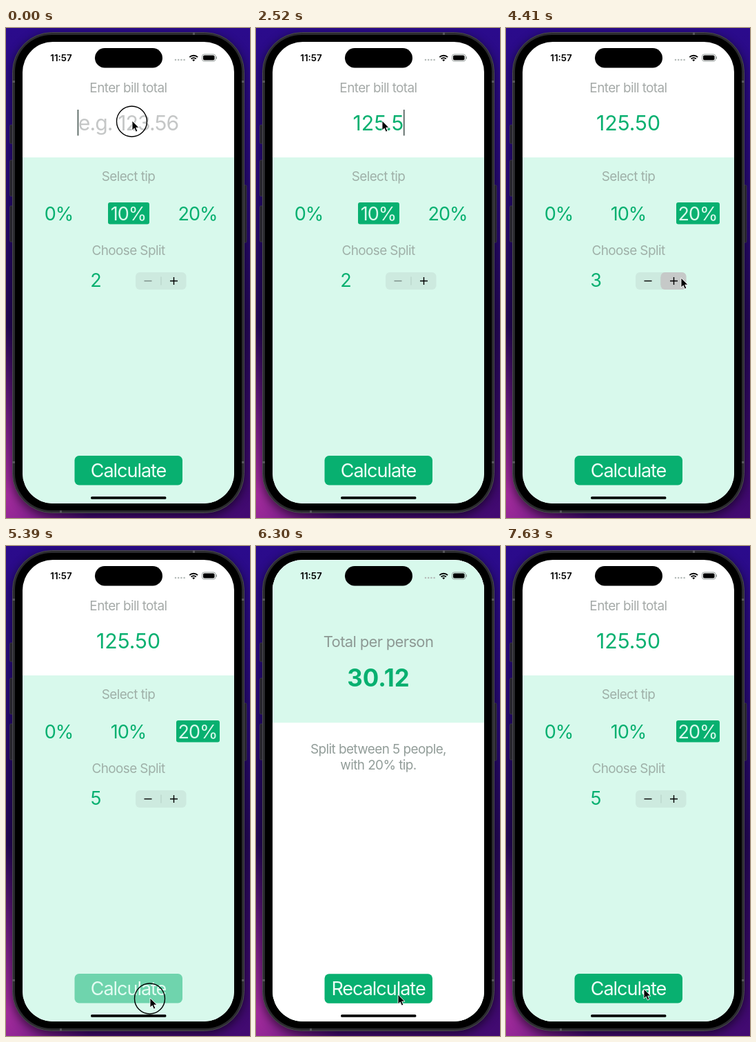
These frames come from a looping animation (354 by 708 pixels, 7.7 s). An HTML page:

```html
<!DOCTYPE html>
<html lang="en">
<head>
<meta charset="utf-8">
<title>Tip calculator</title>
<style>
html, body { margin: 0; height: 100%; overflow: hidden; background: #220a63; }
svg { display: block; width: 100%; height: 100%; }
text { font: 400 18.9px Inter, Roboto, sans-serif; font-optical-sizing: none; letter-spacing: -.03em; text-anchor: middle; fill: #a5aaa8; }
.num { font-size: 30.2px; letter-spacing: 0; fill: #08b070; }
.hint { font-size: 30.2px; letter-spacing: -.03em; fill: #c5c7c7; }
.tip { font-size: 27px; letter-spacing: -.04em; fill: #08b070; }
.tip.on { fill: #d8f9ec; }
.label { font-size: 27px; letter-spacing: -.038em; fill: #effff8; }
.total { font-size: 34.8px; font-weight: 700; }
.caption { font-size: 22px; fill: #8d9994; }
.note { fill: #929d99; }
.clock { font-size: 13.3px; font-weight: 600; letter-spacing: 0; fill: #000; }
.mint { fill: #d8f9ec; }
.soft { fill: #9fb0a8; }
.green { fill: #08b070; }
</style>
</head>
<body>
<svg viewBox="0 0 354 708" preserveAspectRatio="none">
  <defs>
    <linearGradient id="wall" x2="0" y2="1">
      <stop offset="0" stop-color="#2b0b8c"/>
      <stop offset=".3" stop-color="#280a78"/>
      <stop offset=".6" stop-color="#250858"/>
      <stop offset="1" stop-color="#430a72"/>
    </linearGradient>
    <radialGradient id="glow" cx="0" cy=".95" r=".34">
      <stop offset="0" stop-color="#a32c9c"/>
      <stop offset="1" stop-color="#a32c9c" stop-opacity="0"/>
    </radialGradient>
    <filter id="blur"><feGaussianBlur stdDeviation="7"/></filter>
    <clipPath id="screen"><rect x="24" y="20" width="307" height="667" rx="44"/></clipPath>
  </defs>

  <rect width="354" height="708" fill="url(#wall)"/>
  <rect width="354" height="708" fill="url(#glow)"/>
  <rect x="9" y="10" width="337" height="695" rx="57" opacity=".55" filter="url(#blur)"/>

  <g fill="#25232b" stroke="#44424a" stroke-width=".6">
    <rect x="5.500" y="140" width="6" height="27" rx="1.500"/>
    <rect x="5.500" y="191" width="6" height="52" rx="1.500"/>
    <rect x="5.500" y="257" width="6" height="52" rx="1.500"/>
    <rect x="343" y="227" width="6" height="83" rx="1.500"/>
  </g>
  <rect x="9.500" y="6.500" width="336" height="694" rx="57" fill="#2b2b2f" stroke="#4b4a50"/>
  <path d="M9 77.500h4M342 77.500h4M9 627.500h4M342 627.500h4M272.500 6v4M79.500 697v4" stroke="#55545a" stroke-width="3"/>
  <rect x="13" y="10" width="329" height="687" rx="53" fill="#000"/>

  <g clip-path="url(#screen)">
    <rect x="24" y="20" width="308" height="668" fill="#fff"/>
    <rect class="mint" x="24" y="187" width="308" height="501"/>
    <text x="177.500" y="92.500">Enter bill total</text>
    <text id="hint" class="hint" x="177.500" y="147.500">e.g. 123.56</text>
    <text id="bill" class="num" x="177.500" y="147.500"></text>
    <rect id="caret" y="118" width="1.500" height="37.500" fill="#3f4f4a"/>

    <text class="soft" x="177.500" y="221">Select tip</text>
    <rect id="pick" class="green" y="252" height="31.500" rx="3"/>
    <text class="tip" x="76.500" y="277.500">0%</text>
    <text class="tip" x="177.500" y="277.500">10%</text>
    <text class="tip" x="278" y="277.500">20%</text>

    <text class="soft" x="177.500" y="327.500">Choose Split</text>
    <text id="count" class="tip" x="130" y="374"></text>
    <rect x="188" y="353" width="73.500" height="25" rx="6" fill="#cdeadf"/>
    <path d="M225 359.500v12" stroke="#b3cdc3"/>
    <rect id="press" x="224.500" y="353" width="37" height="25" rx="6" fill="#c6c9c8"/>
    <path id="minus" d="M200.500 365.500h11" stroke="#000" stroke-width="1.400"/>
    <path d="M238 365.500h11M243.500 360v11" stroke="#000" stroke-width="1.400"/>

    <g id="calc">
      <rect class="green" x="99.500" y="618" width="156.500" height="42.500" rx="6.500"/>
      <text class="label" x="177.500" y="649">Calculate</text>
    </g>

    <g id="sheet">
      <rect x="24" y="20" width="308" height="668" fill="#fff"/>
      <rect class="mint" x="24" y="20" width="308" height="235"/>
      <text class="caption" x="177.500" y="146">Total per person</text>
      <text class="num total" x="177.500" y="203">30.12</text>
      <text class="note" x="177.500" y="300">Split between 5 people,</text>
      <text class="note" x="177.500" y="323">with 20% tip.</text>
      <g id="again">
        <rect class="green" x="99.500" y="618" width="156.500" height="42.500" rx="6.500"/>
        <text class="label" x="177.500" y="649">Recalculate</text>
      </g>
    </g>

    <text class="clock" x="80" y="47.700">11:57</text>
    <rect x="129" y="29" width="98" height="28.500" rx="14.250"/>
    <path d="M246 46h13" stroke="#b5bbb9" stroke-width="2.600" stroke-linecap="round" stroke-dasharray="0 4.200"/>
    <g fill="none" stroke="#000" stroke-width="1.900">
      <path d="M266.300 42.200a8.300 8.300 0 0 1 11.800 0M268.600 44.700a5 5 0 0 1 7.200 0"/>
      <path d="M270.200 46l2 2.200 2-2.200q-2-1.500-4 0z" fill="#000" stroke="none"/>
    </g>
    <rect x="284.500" y="38" width="19.500" height="10" rx="3" fill="none" stroke="#8e9693" stroke-width=".9"/>
    <rect x="286" y="39.500" width="16.500" height="7" rx="1.800"/>
    <path d="M305.400 41.300v3.400" stroke="#8e9693" stroke-width="1.200"/>
    <rect x="123" y="677" width="109.500" height="3.800" rx="1.900"/>
  </g>

  <g id="mouse">
    <circle id="touch" cx="-.5" cy="1" r="22" fill="none" stroke="#000" stroke-width="1.400"/>
    <path d="M0 0V14l3.200-3 2.200 5.100 2.500-1.100-2.200-4.900h4.300z" stroke="#fff" stroke-width=".9"/>
  </g>
</svg>
<script>
const LOOP = 7700, STEP = 70, HEIGHT = 668;
const $ = id => document.getElementById(id);
const tips = document.querySelectorAll('.tip');

const typed = [[0, ''], [1330, '1'], [1400, '12'], [1540, '125'], [2170, '125.'], [2520, '125.5'], [2730, '125.50']];
const counts = [[0, 2], [4270, 3], [4550, 4], [4760, 5]];
const touches = [[0, 70], [3710, 3850], [4270, 4340], [4550, 4620], [4760, 4830], [5390, 5530], [6790, 7000]];
const path = [[0, 183, 134], [3220, 183, 134], [3710, 283, 267], [3850, 283, 267], [4270, 254, 361],
  [5040, 254, 361], [5390, 209, 653], [5740, 209, 653], [6300, 206, 648], [6510, 206, 648], [6790, 200, 640], [LOOP, 200, 640]];
const blink = [[0, 1], [490, 1], [770, 0], [840, 0], [1050, 1], [2030, 1], [2310, 0]];

const latest = (list, t) => list.filter(k => k[0] <= t).pop()[1];
const within = (t, a, b) => t >= a && t < b;
const clamp = v => Math.min(1, Math.max(0, v));
const smooth = p => p * p * (3 - 2 * p);

function tween(keys, t, ease = p => p) {
  const i = keys.findIndex(k => k[0] > t);
  if (i < 0) return keys[keys.length - 1].slice(1);
  const a = keys[i - 1], b = keys[i], p = ease((t - a[0]) / (b[0] - a[0]));
  return a.slice(1).map((v, n) => v + (b[n + 1] - v) * p);
}

// Remaining distance of a critically damped spring, from 1 to 0.
function spring(ms) {
  const x = Math.max(0, ms) * .01305;
  return (1 + x) * Math.exp(-x);
}

function caretAlpha(t) {
  if (t >= 3080) return 0;
  if (t >= 3010) return .5;
  return t >= 2170 ? 1 : tween(blink, t)[0];
}

function draw(t) {
  const value = latest(typed, t), bill = $('bill'), hint = $('hint');
  bill.textContent = value;
  hint.style.opacity = value ? 0 : 1;
  const caretX = value ? 177.5 + bill.getComputedTextLength() / 2 : 177 - hint.getComputedTextLength() / 2;
  $('caret').setAttribute('x', caretX - .5);
  $('caret').style.opacity = caretAlpha(t);

  const picked = t < 3780 ? 1 : 2;
  tips.forEach((tip, i) => tip.classList.toggle('on', i === picked));
  $('pick').setAttribute('x', picked === 1 ? 148 : 247);
  $('pick').setAttribute('width', picked === 1 ? 60 : 63);

  const count = latest(counts, t);
  $('count').textContent = count;
  $('minus').style.opacity = count > 2 ? 1 : .4;
  $('press').style.opacity = t < 4270 ? 0 : clamp((4970 - t) / 140);

  $('calc').style.opacity = within(t, 5390, 5530) ? .5 : 1;
  $('again').style.opacity = within(t, 6790, 7000) ? .5 : 1;
  const drop = t < 7000 ? spring(t - 5530) : 1 - spring(t - 7045.5);
  $('sheet').setAttribute('transform', `translate(0 ${drop * HEIGHT})`);

  $('mouse').setAttribute('transform', `translate(${tween(path, t, smooth)})`);
  $('touch').style.opacity = touches.some(([a, b]) => within(t, a, b)) ? 1 : 0;
}

const start = performance.now();
function frame() {
  const t = (performance.now() - start) % LOOP;
  draw(Math.floor(t / STEP) * STEP);
  requestAnimationFrame(frame);
}
frame();
</script>
</body>
</html>
```
